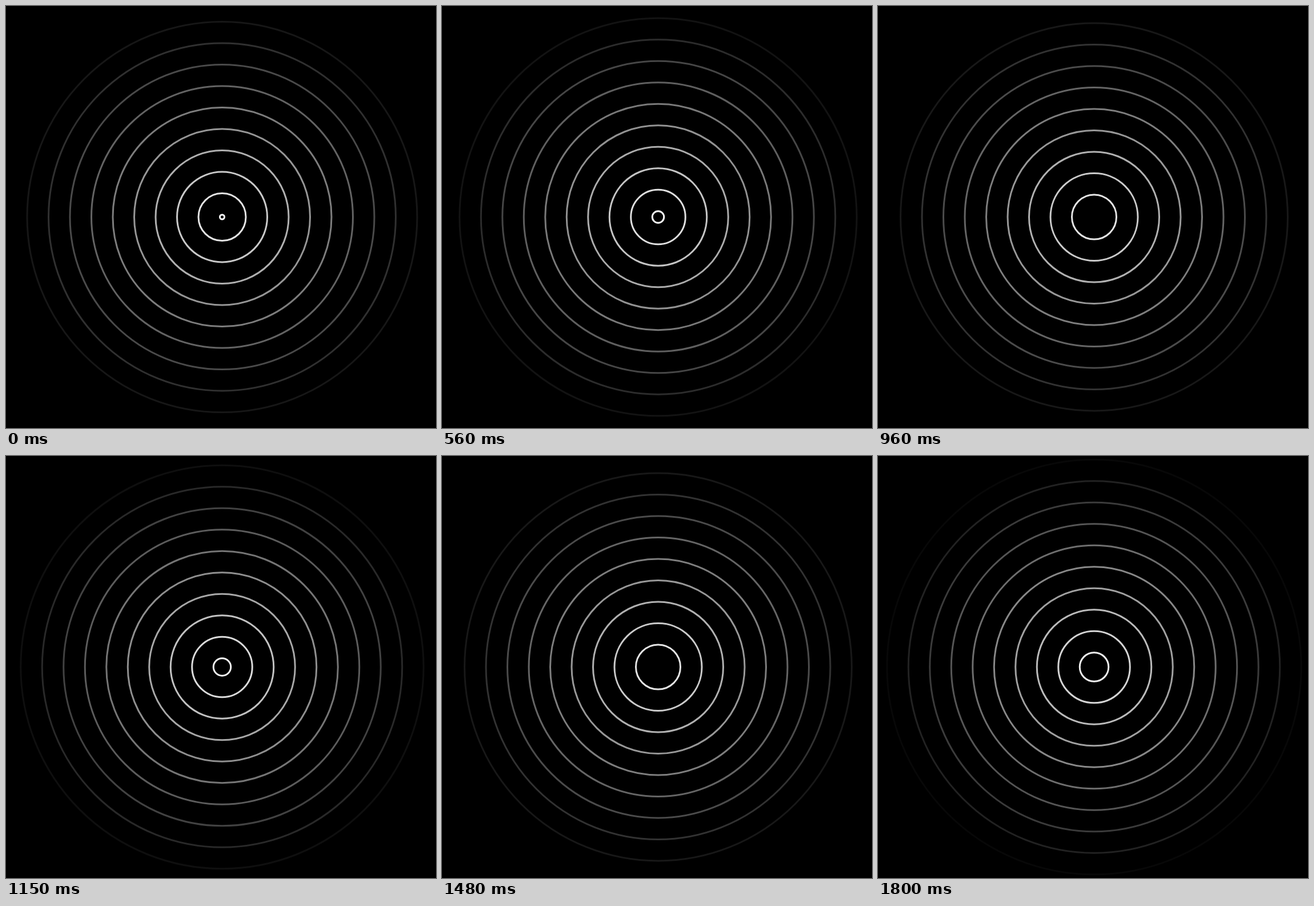
Write an HTML page with a canvas that moves like this. It is 753 by 738 pixels and loops after 1.87 s.

```html
<!DOCTYPE html>
<html lang="en">
<head>
<meta charset="utf-8">
<title>Expanding rings</title>
<style>
  html, body { margin: 0; width: 100%; height: 100%; overflow: hidden; background: #000; }
  canvas { display: block; }
</style>
</head>
<body>
<canvas id="stage" width="753" height="738"></canvas>
<script>
const ctx = document.getElementById('stage').getContext('2d');
const CENTER = { x: 378.5, y: 369 };
const RING_COUNT = 10;
const GAP = 37.5;
const MAX_RADIUS = RING_COUNT * GAP;
const TICK = 1000 / 60;
const GROWTH = 1.25; // pixels per tick
const START = 4;
const FIRST_JUMP = 2; // extra ticks after the opening pose

// How long each pose is held, in ms
const HOLDS = [
  50, 70, 70, 70,
  70, 50, 50, 50, 50, 30,
  70, 70, 70, 50,
  70, 70, 70, 50, 70,
  70, 70, 50, 70, 70,
  70, 50, 60, 70, 70,
  70
];
const LOOP = HOLDS.reduce((sum, hold) => sum + hold, 0);

function phaseAt(time) {
  let ticks = 0;
  for (const hold of HOLDS) {
    if (time < hold) break;
    time -= hold;
    if (ticks === 0) ticks = FIRST_JUMP;
    ticks += Math.round(hold / TICK);
  }
  return (START + ticks * GROWTH) % GAP;
}

function drawRing(radius) {
  if (radius < 2 || radius >= MAX_RADIUS) return;
  const gray = Math.round(255 * (1 - radius / MAX_RADIUS));
  ctx.strokeStyle = `rgb(${gray}, ${gray}, ${gray})`;
  ctx.beginPath();
  ctx.arc(CENTER.x, CENTER.y, radius, 0, Math.PI * 2);
  ctx.stroke();
}

function draw(time) {
  ctx.fillStyle = '#000';
  ctx.fillRect(0, 0, 753, 738);
  ctx.lineWidth = 3;
  const phase = phaseAt(time);
  for (let i = 0; i < RING_COUNT; i++) drawRing(phase + i * GAP);
}

const started = performance.now();
function tick() {
  draw((performance.now() - started) % LOOP);
  requestAnimationFrame(tick);
}
tick();
</script>
</body>
</html>
```
